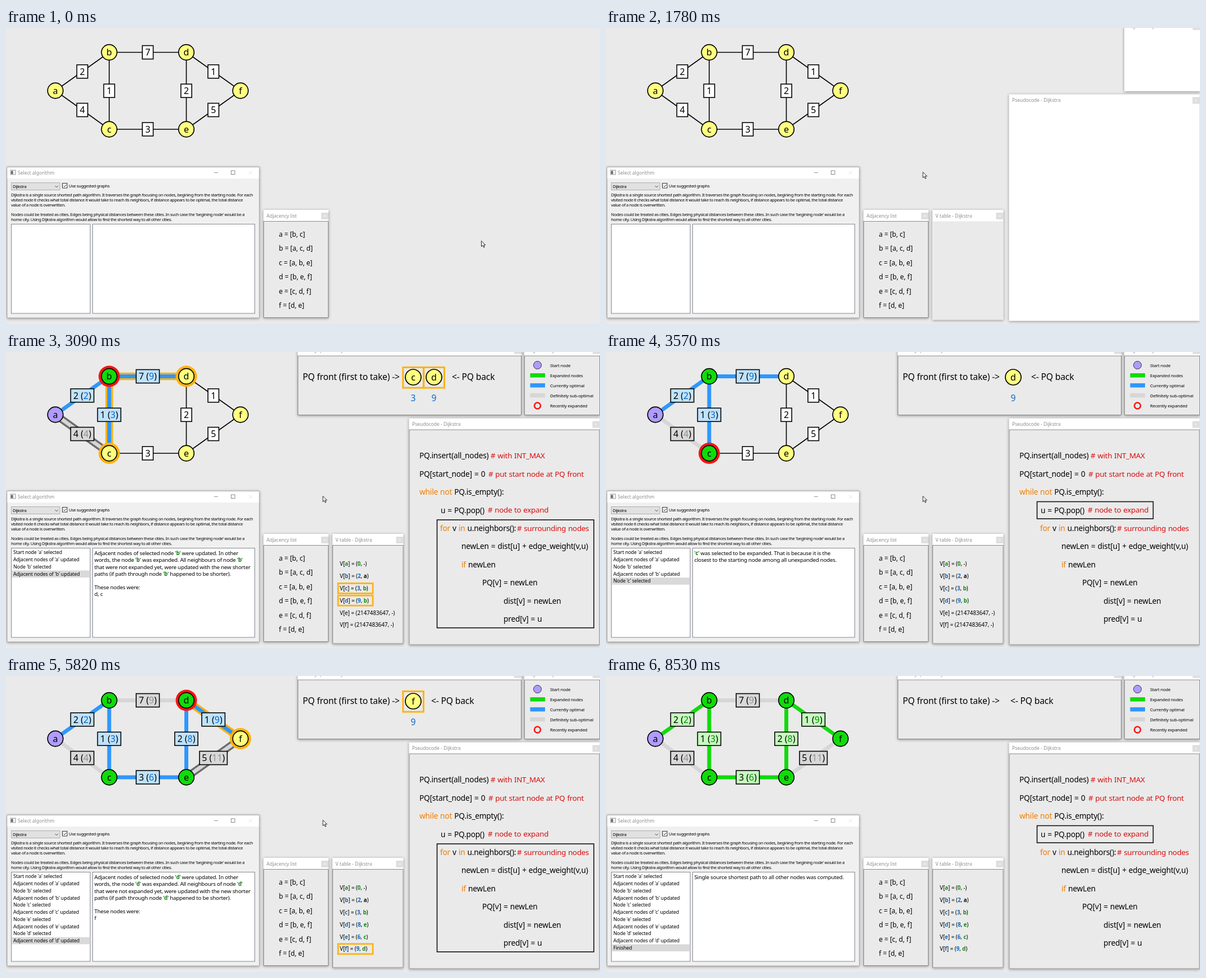
These frames come from a looping animation (1059x529 px, 8620 ms). An HTML page:

```html
<!DOCTYPE html>
<html lang="en">
<head>
<meta charset="utf-8">
<title>Dijkstra step by step</title>
<style>
html, body { margin: 0; width: 100%; height: 100%; overflow: hidden; background: #eaeaea; }
svg { display: block; width: 100vw; height: 100vh; font-family: "Noto Sans", "Open Sans", sans-serif; }
.win { filter: drop-shadow(0 1px 2.5px rgba(0, 0, 0, .4)); }
.kw { fill: #f07d00; }
.bold { font-weight: 700; }
</style>
</head>
<body>
<svg viewBox="0 0 1059 529" xmlns="http://www.w3.org/2000/svg">
  <g id="base"></g>
  <g id="scene"></g>
  <path id="cursor" d="M.5 .5V10.6L2.9 8.4L4.6 12.2L6.2 11.5L4.6 7.8H7.8Z" fill="#fff" stroke="#111" stroke-width=".9"/>
  <circle id="spot" cx="1050.5" cy="534" r="7" fill="#ffe64a"/>
</svg>
<script>
const LOOP = 8620;
const ORANGE = '#ffb30f', RED = '#f81414', BLUE = '#2e97ff', GREEN = '#10db0a',
      PURPLE = '#b09cff', YELLOW = '#ffff80', GRAY = '#d6d6d6', BG = '#eaeaea', INK = '#0b6bc6';
const $ = id => document.getElementById(id);

// font roles: size, letter spacing, word spacing
const FONTS = {
  node: [16, 0, 0], pq: [15.6, -.15, 0], code: [13.7, -.2, .7], rem: [13.4, -.3, .7],
  adj: [12, -.05, 0], table: [10, -.12, 0], title: [8.5, 0, 0], legend: [7.8, -.17, 0],
  tiny: [7.6, -.35, 0], item: [8.8, -.15, 0], note: [9.7, -.2, 0]
};

function text(x, y, role, str, fill = '#000', anchor = 'start') {
  const [size, gap, space] = FONTS[role];
  return `<text x="${x}" y="${y + size * .34}" font-size="${size}" letter-spacing="${gap}" word-spacing="${space}" fill="${fill}" text-anchor="${anchor}">${str}</text>`;
}
const bold = (str, fill) => `<tspan class="bold" fill="${fill}">${str}</tspan>`;
const rect = (x, y, w, h, fill, stroke = 'none', sw = 1) =>
  `<rect x="${x}" y="${y}" width="${w}" height="${h}" fill="${fill}" stroke="${stroke}" stroke-width="${sw}"/>`;
const disc = (x, y, r, fill, stroke = 'none', sw = 1.7) =>
  `<circle cx="${x}" cy="${y}" r="${r}" fill="${fill}" stroke="${stroke}" stroke-width="${sw}"/>`;
const path = (d, stroke, sw) => `<path d="${d}" fill="none" stroke="${stroke}" stroke-width="${sw}"/>`;
const frame = (x, y, w, h) => rect(x, y, w, h, 'none', '#111', 1.6);

function win(x, y, w, h, title, body, line) {
  const cx = x + w - 13, top = y + 20.5;
  return `<g class="win">${rect(x, y, w, h, '#fff')}</g>` +
    rect(x + .5, top, w - 1, h - 21, body, line) +
    rect(cx, y + 5, 13, 12, '#dedede') +
    path(`M${cx + 4.5} ${y + 9}l4 4m0 -4l-4 4`, '#f4f4f4', 1) +
    text(x + 5.5, y + 11, 'title', title, '#8c8c8c');
}

// graph
const POS = { a: [88, 112], b: [184, 43.5], c: [184, 181], d: [321.5, 43.5], e: [321.5, 181], f: [418, 112] };
const EDGES = { ab: 2, ac: 4, bc: 1, bd: 7, ce: 3, de: 2, df: 1, ef: 5 };
const NEAR = { a: 'bc', b: 'acd', c: 'abe', d: 'bef', e: 'cdf', f: 'de' };
const NAMES = Object.keys(POS);
const key = (u, v) => u < v ? u + v : v + u;

const LABELS = {
  opt: ['#bfe2fd', INK], sub: ['#d8d8d8', '#929292'], tree: ['#c5fdbd', '#0c8a0c']
};

function edgeLine(k, edge) {
  const d = `M${POS[k[0]]}L${POS[k[1]]}`;
  if (!edge) return path(d, '#000', 1.6);
  if (edge.kind === 'sub') return edge.hot ? path(d, '#6c6c6c', 13.5) + path(d, GRAY, 6.5) : path(d, GRAY, 7);
  return (edge.hot ? path(d, ORANGE, 13.5) : '') + path(d, edge.kind === 'tree' ? GREEN : BLUE, 7);
}

function edgeLabel(k, edge) {
  const [p, q] = [POS[k[0]], POS[k[1]]];
  const x = (p[0] + q[0]) / 2, y = (p[1] + q[1]) / 2;
  const w = !edge ? 19.4 : edge.cost > 9 ? 49.4 : 41.4;
  const [fill, ink] = edge ? LABELS[edge.kind] : ['#fff'];
  const str = EDGES[k] + (edge ? ` (<tspan fill="${ink}">${edge.cost}</tspan>)` : '');
  return rect(x - w / 2, y - 12, w, 24, fill, '#000', 1.6) + text(x, y + .5, 'node', str, '#000', 'middle');
}

function graph(s) {
  const keys = Object.keys(EDGES);
  const nodes = NAMES.map(n => {
    const [x, y] = POS[n];
    const ring = s.red === n ? RED : s.hot.includes(n) ? ORANGE : null;
    const fill = n === 'a' && s.started ? PURPLE : s.done.includes(n) ? GREEN : YELLOW;
    return (ring ? disc(x, y, 19, ring) : '') + disc(x, y, 13.8, fill, '#000') +
      text(x, y + .5, 'node', n, '#000', 'middle');
  });
  return keys.map(k => edgeLine(k, s.edges[k])).join('') + nodes.join('') +
    keys.map(k => edgeLabel(k, s.edges[k])).join('');
}

// side windows
function queue(s) {
  const list = NAMES.filter(n => n in s.dist && !s.done.includes(n)).sort((m, n) => s.dist[m] - s.dist[n]);
  return win(520, -13.5, 399, 126.5, 'Priority queue - Dijkstra', BG, '#8a8a8a') +
    text(529, 45, 'pq', 'PQ front (first to take) -&gt;') +
    list.map((n, i) => {
      const x = 726 + 37 * i;
      return disc(x, 45, 14, YELLOW, '#000') + text(x, 45.5, 'node', n, '#000', 'middle') +
        (s.hot.includes(n) ? rect(x - 18.2, 27.4, 36.6, 36.6, 'none', ORANGE, 3) : '') +
        text(x, 83, 'pq', s.dist[n], INK, 'middle');
    }).join('') +
    text(721 + 37 * list.length, 45, 'pq', '&lt;- PQ back');
}

function legend() {
  const rows = ['Start node', 'Expanded nodes', 'Currently optimal', 'Definitely sub-optimal', 'Recently expanded'];
  return disc(947.5, 23.5, 7, PURPLE, '#333', 1) +
    [GREEN, BLUE, GRAY].map((c, i) => rect(934.5, 38 + 17.9 * i, 26.5, 7.5, c)).join('') +
    disc(947.5, 96, 5.5, 'none', RED, 2.5) +
    rows.map((r, i) => text(970, 24.3 + 17.95 * i, 'legend', r)).join('');
}

const CODE = [
  [737, 'PQ.insert(all_nodes)', 864, '# with INT_MAX'],
  [737, 'PQ[start_node] = 0', 860, '# put start node at PQ front'],
  [737, '<tspan class="kw">while not</tspan> PQ.is_empty():'],
  [775, 'u = PQ.pop()', 859, '# node to expand'],
  [774, '<tspan class="kw">for</tspan> v <tspan class="kw">in</tspan> u.neighbors():', 911, '# surrounding nodes'],
  [812, 'newLen = dist[u] + edge_weight(v,u)'],
  [812, '<tspan class="kw">if</tspan> newLen'],
  [849, 'PQ[v] = newLen'],
  [887, 'dist[v] = newLen'],
  [887, 'pred[v] = u']
];

function code(s) {
  return CODE.map(([x, str, rx, rem], i) => {
    const y = 185.5 + 32.45 * i;
    return text(x, y, 'code', str) + (rem ? text(rx, y, 'rem', rem, '#d80c0c') : '');
  }).join('') + (s.mode === 'update' ? frame(768.5, 300, 279.5, 193) : frame(768.5, 267.5, 207, 30.5));
}

function table(s) {
  return NAMES.map((n, i) => {
    const y = 379 + 21.8 * i, known = n in s.dist, from = s.pred[n];
    const ink = n === 'a' ? '#148a14' : INK;
    const name = known ? bold(n, ink) : n;
    const value = known ? bold(s.dist[n], ink) : 2147483647;
    const last = from ? bold(from, from === 'a' ? '#111' : '#148a14') : '-';
    return text(595, y, 'table', `V[${name}] = (${value}, ${last})`) +
      (s.hot.includes(n) ? rect(592, y - 9.2, 62, 18, 'none', ORANGE, 2.8) : '');
  }).join('');
}

function log(s) {
  return s.log.map((line, i) => {
    const y = 358.5 + 12.72 * i;
    return (i === s.log.length - 1 ? rect(10.5, y - 6.2, 139, 12.6, '#d9d9d9') : '') + text(13, y, 'item', line);
  }).join('') + s.note.map((line, i) => text(157.5, 360 + 12.2 * i, 'note', line)).join('');
}

// run the algorithm and keep a snapshot of each step
function snapshots() {
  const s = { dist: {}, pred: {}, done: [], edges: {}, hot: [], log: [], note: [], red: '', started: false, mode: '' };
  const out = [];
  const keep = at => out.push({ at, ...structuredClone(s) });
  const calm = () => { s.hot = []; for (const k in s.edges) s.edges[k].hot = false; };
  const quote = n => `'${bold(n, n === 'a' ? '#3b1fe0' : '#0b800b')}'`;

  function select(at, n) {
    calm();
    s.mode = 'select';
    s.red = n;
    s.done.push(n);
    s.log.push(s.started ? `Node '${n}' selected` : `Start node '${n}' selected`);
    s.note = s.started
      ? [`${quote(n)} was selected to be expanded. That is because it is the`,
         'closest to the starting node among all unexpanded nodes.']
      : [`${quote(n)} was selected as the starting node.`];
    if (!s.started) s.dist[n] = 0;
    s.started = true;
    keep(at);
  }

  function update(at, u, order) {
    s.mode = 'update';
    for (const v of NEAR[u]) {
      const k = key(u, v), cost = s.dist[u] + EDGES[k];
      if (s.done.includes(v) || cost >= (s.dist[v] ?? Infinity)) continue;
      if (s.pred[v]) Object.assign(s.edges[key(s.pred[v], v)], { kind: 'sub', hot: true });
      s.edges[k] = { kind: 'opt', hot: true, cost };
      s.dist[v] = cost;
      s.pred[v] = u;
      s.hot.push(v);
    }
    s.log.push(`Adjacent nodes of '${u}' updated`);
    const q = quote(u);
    s.note = [`Adjacent nodes of selected node ${q} were updated. In other`,
      `words, the node ${q} was expanded. All neighbours of node ${q}`,
      'that were not expanded yet, were updated with the new shorter',
      `paths (if path through node ${q} happened to be shorter).`,
      '', 'These nodes were:', order];
    keep(at);
  }

  keep(0);
  keep(1780);
  select(1860, 'a'); update(2170, 'a', 'b, c');
  select(2630, 'b'); update(3090, 'b', 'd, c');
  select(3570, 'c'); update(4030, 'c', 'e');
  select(4490, 'e'); update(4960, 'e', 'd, f');
  select(5360, 'd'); update(5820, 'd', 'f');

  calm();
  s.mode = 'end';
  s.red = '';
  s.done.push('f');
  for (const k in s.edges) if (s.edges[k].kind === 'opt') s.edges[k].kind = 'tree';
  s.log.push('Finished');
  s.note = ['Single source shortest path to all other nodes was computed.'];
  keep(6380);
  return out;
}

function base() {
  const about = [
    'Dijkstra is a single source shortest path algorithm. It traverses the graph focusing on nodes, begining from the starting node. For each',
    'visited node it checks what total distance it would take to reach its neighbors, if distance appears to be optimal, the total distance',
    'value of a node is overwritten.', '',
    "Nodes could be treated as cities. Edges being physical distances between these cities. In such case the 'begining node' would be a",
    'home city. Using Dijkstra algorithm would allow to find the shortest way to all other cities.'
  ];
  return `<g class="win">${rect(2, 248.5, 449.5, 269.5, '#f0f0f0', '#a6a6a6', .8)}</g>` +
    rect(2.4, 249, 448.7, 20, '#fff') +
    rect(8, 254, 9, 8, '#f4f4f4', '#8d8d8d', .9) + rect(9, 255.5, 3.5, 5.5, '#666') +
    text(21, 259.3, 'title', 'Select algorithm', '#8c8c8c') +
    path('M371 258.5h7', '#999', 1) + rect(401.5, 255, 6.5, 6.5, 'none', '#888') +
    path('M433 255.5l6 6m0 -6l-6 6', '#e4e4e4', 1) +
    rect(9.5, 276.5, 86.5, 13, '#e1e1e1', '#adadad') + text(12, 283.7, 'tiny', 'Dijkstra') +
    path('M87.5 282l2.7 2.7l2.7 -2.7', '#444', 1) +
    rect(100.5, 277.5, 8.5, 8.5, '#fff', '#333') + path('M102.3 281.8l2 2l3.4 -4', '#222', 1) +
    text(112, 282.5, 'tiny', 'Use suggested graphs') +
    about.map((line, i) => text(9, 298.5 + 8.72 * i, 'tiny', line)).join('') +
    rect(9.5, 350.5, 140.5, 159.5, '#fff', '#828790') + rect(154.5, 350.5, 289, 159.5, '#fff', '#828790') +
    win(459, 325, 116, 193, 'Adjacency list', BG, '#8a8a8a') +
    NAMES.map((n, i) => text(486.5, 369 + 25.4 * i, 'adj', `${n} = [${[...NEAR[n]].join(', ')}]`)).join('');
}

function draw(s, i) {
  if (!i) return graph(s);
  const body = s.started ? BG : '#fff', line = s.started ? '#8a8a8a' : 'none';
  return graph(s) +
    win(924, -13.5, 135, 126.5, 'Legend - Dijkstra', body, line) +
    win(718.5, 118.5, 340, 405, 'Pseudocode - Dijkstra', body, line) +
    win(582, 325, 126.5, 196.5, 'V table - Dijkstra', BG, line) +
    (s.started ? queue(s) + legend() + code(s) + table(s) + log(s) : '');
}

// time, x, y of the pointer
const MOVES = [
  [0, 847, 380], [70, 790, 352], [140, 705, 304], [210, 663, 283],
  [360, 652, 279], [440, 628, 266], [520, 604, 259], [600, 602, 257], [680, 609, 265],
  [830, 600, 263], [915, 575, 258], [1000, 564.5, 257],
  [7690, 600, 238], [7770, 672, 205], [7850, 780, 180], [7920, 930, 270], [8000, 1048, 513], [8070, 1100, 600]
];

const steps = snapshots();
const scenes = steps.map(draw);
const indexAt = (list, t, time) => list.findLastIndex(e => time(e) <= t);
const start = performance.now();
let shown = -1;

function tick() {
  const t = (performance.now() - start) % LOOP;
  const i = indexAt(steps, t, e => e.at);
  if (i !== shown) $('scene').innerHTML = scenes[shown = i];
  const [, x, y] = MOVES[indexAt(MOVES, t, e => e[0])];
  $('cursor').setAttribute('transform', `translate(${x} ${y})`);
  $('spot').style.visibility = t >= 8530 ? 'visible' : 'hidden';
  requestAnimationFrame(tick);
}

$('base').innerHTML = base();
tick();
</script>
</body>
</html>
```
